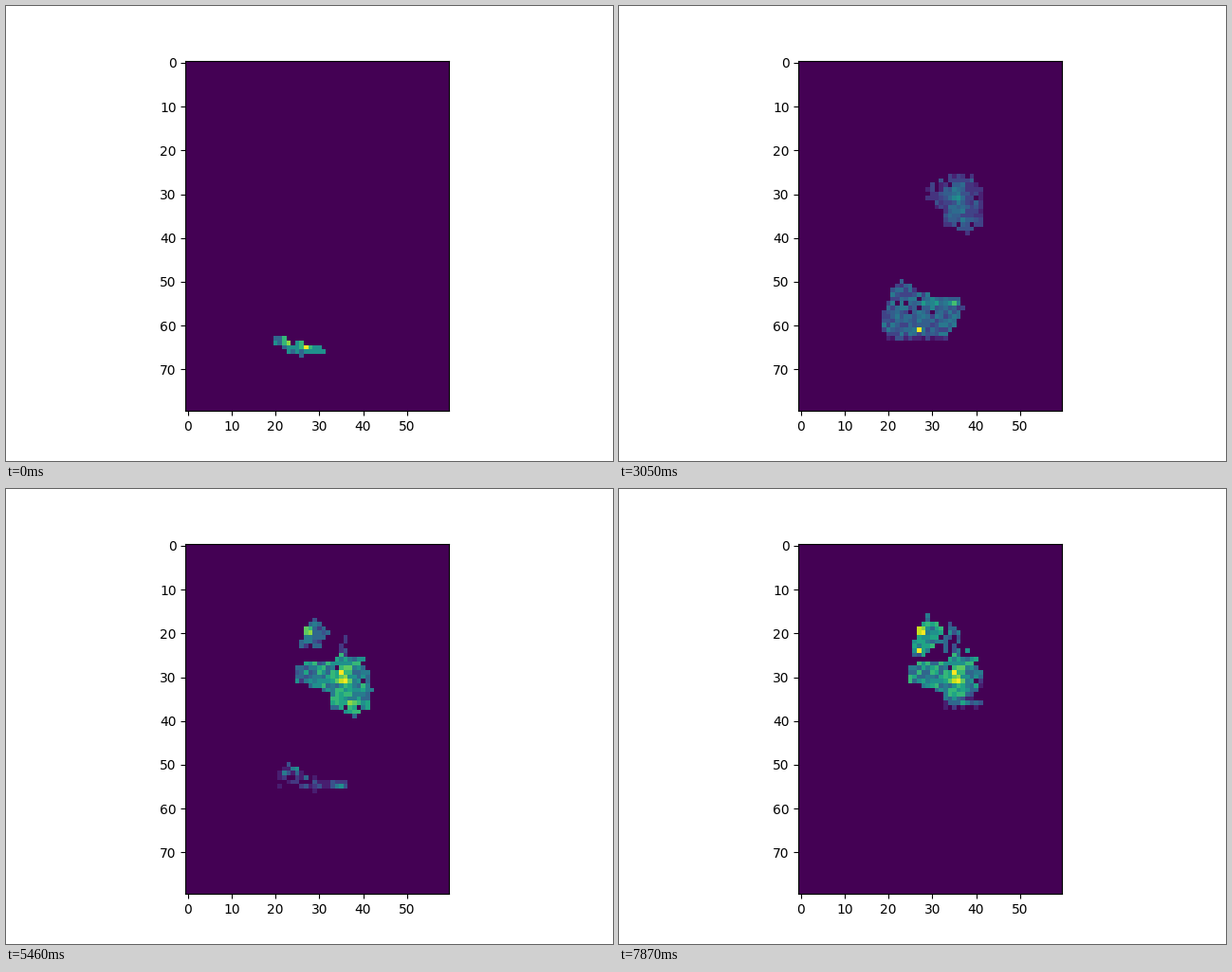
Recreate the animation shown at these times as a matplotlib script. Size 640 by 480 pixels, loop 8000 ms.

```python
import numpy as np
import matplotlib.pyplot as plt
from matplotlib.animation import FuncAnimation
from matplotlib.path import Path

ROWS, COLS = 80, 60
STEPS, STEP_MS = 50, 160
HOLDS = (11, 28, 44)  # steps that repeat the picture before them
RISE, FADE = 14, 8    # steps a cell takes to reach full strength and to die

rng = np.random.default_rng(4)
texture, gaps, delay, linger = rng.random((4, ROWS, COLS))
yy, xx = np.mgrid[:ROWS, :COLS]
cells = np.column_stack([xx.ravel(), yy.ravel()])


def glow(x, y, sx, sy, gain):
    return gain * np.exp(-((xx - x) / sx) ** 2 - ((yy - y) / sy) ** 2)


def inside(*outline):
    """Cells within a closed outline, its border included."""
    path = Path(outline + outline[:1], closed=True)
    hits = [path.contains_points(cells, radius=r) for r in (-.3, .3)]
    return np.any(hits, axis=0).reshape(ROWS, COLS)


def spread(x, y, start, speed, squeeze=1.0):
    """Arrival time of a ragged wave running out from a point."""
    distance = np.hypot((xx - x) * squeeze, yy - y)
    return start + speed * distance * (.8 + .6 * delay)


def add_lobe(area, arrival, level, holes):
    area = area & (gaps >= holes)
    onset[area] = arrival[area]
    strength[area] = level * (1.8 + 2.4 * texture + warmth)[area]


warmth = (glow(29, 55, 2.6, 1.1, 2.6) + glow(35, 55, 2, .5, 3.4)
          + glow(27, 61, .6, .5, 7) + glow(27, 65, 1.6, .5, 3)
          + glow(23, 63.4, 1, .7, 1.6) + glow(35.7, 30, 1.3, 2, 2.8)
          + glow(37, 36, .7, .6, 3) + glow(27.4, 19.6, 1, 1.3, 3.8)
          + glow(27, 24, .6, .5, 3))

onset = np.full((ROWS, COLS), np.inf)
strength = np.zeros((ROWS, COLS))

# Lower lobe: a slanted front climbs from its bottom edge
front = 63 + .25 * (xx - 22)
climb = .65 * np.maximum(front - yy, 0) * (.8 + .5 * delay)
add_lobe(inside((23, 50), (21, 52), (20, 55), (19, 57), (19, 61), (20, 64),
                (23, 66), (26, 67), (28, 66), (31, 66), (33, 63), (35, 60),
                (37, 56), (36, 54), (28, 53), (25, 51)), climb, 1, .03)

# Upper lobe, its head and the thin arm beside the head
add_lobe(inside((25, 28), (27, 27), (33, 27), (35, 25), (40, 26), (41, 29),
                (42, 33), (41, 37), (38, 39), (33, 37), (33, 34), (28, 32),
                (25, 31)), spread(36, 33, 5, 1.5, 1.3), 1, .05)
add_lobe(inside((29, 16), (27, 18), (26, 22), (26, 25), (28, 25), (31, 22),
                (33, 22), (32, 19)), spread(27.5, 20, 24, 2.4), 1, .05)
add_lobe(inside((33, 20), (34, 18), (36, 19), (36, 22), (38, 24), (36, 25),
                (33, 24)), spread(36, 23, 30, 1.8), .7, .35)

# Cells die from the bottom of each lobe upward; warm ones last longer
end = np.interp(yy, [16, 30, 36, 39, 50, 58, 62, 65, 67],
                [80, 70, 52, 44, 39, 31, 27, 13, 4])
end += 4 * (linger - .5) + np.minimum(warmth, 3)
end -= 3 * np.maximum(xx - 37, 0) * (yy < 36)


def activity(step):
    if step in HOLDS:
        step -= 1
    rise = .5 + .5 * np.clip((step - onset) / RISE, 0, 1)
    fade = np.clip((end - step) / FADE, 0, 1)
    return np.where(step >= onset, np.round(strength * rise * fade * 2) / 2, 0)


fig, ax = plt.subplots(figsize=(6.4, 4.8), dpi=100)
image = ax.imshow(np.zeros((ROWS, COLS)), cmap="viridis", vmin=0, vmax=1,
                  interpolation="nearest")


def draw(step):
    field = activity(step)
    image.set_data(field / field.max())
    return [image]


anim = FuncAnimation(fig, draw, frames=STEPS, interval=STEP_MS,
                     init_func=lambda: draw(0), repeat=True, repeat_delay=0)
plt.show()
```
